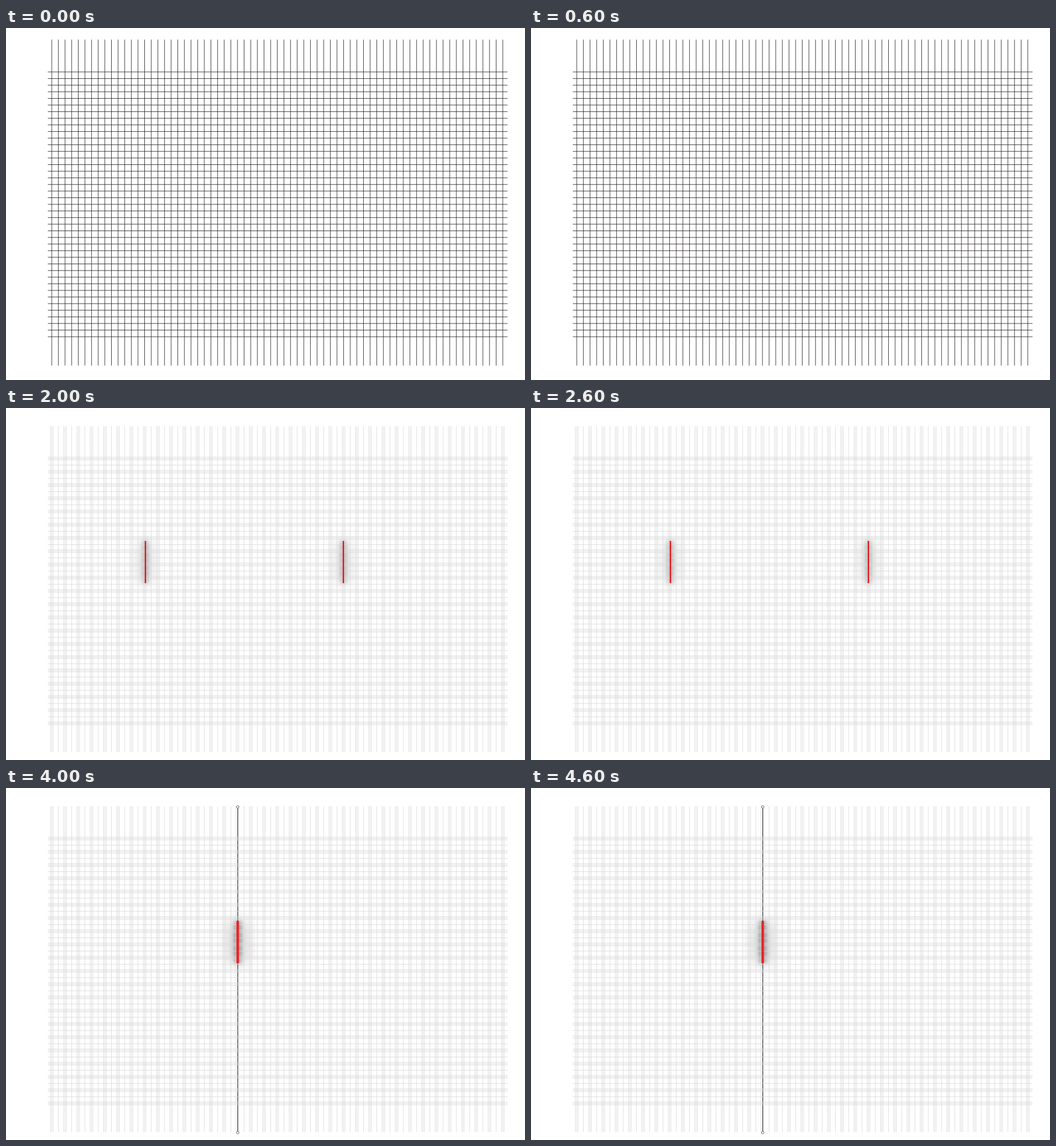
Recreate the animation shown at these times as an HTML page. Size 908 px wide and 617 px high, loop 5000 ms.

```html
<!DOCTYPE html>
<html lang="en">
<head>
<meta charset="utf-8">
<title>Grid</title>
<style>
html, body { margin: 0; width: 100%; height: 100%; overflow: hidden; background: #fff; }
svg { display: block; width: 908px; height: 617px; }
.grid path { fill: none; stroke-width: 0.85; }
</style>
</head>
<body>
<svg id="stage" viewBox="0 0 908 617" xmlns="http://www.w3.org/2000/svg">
  <defs>
    <filter id="near" filterUnits="userSpaceOnUse" x="0" y="0" width="908" height="617"><feGaussianBlur stdDeviation="4"/></filter>
    <filter id="far" filterUnits="userSpaceOnUse" x="0" y="0" width="908" height="617"><feGaussianBlur stdDeviation="14"/></filter>
  </defs>
</svg>
<script>
const stage = document.getElementById('stage');
const STEP = 11.604, LEFT = 80.05, COLS = 69, ROWS = 41, OFFSET = 2.35;
const HIGH = 20.4, LOW = 32;
const BAR_TOP = 233, BAR_HEIGHT = 74;
const INK = '#231f20', RED = '#c1272d', PALE = '#dadada';

function add(parent, name, attrs = {}) {
  const node = document.createElementNS('http://www.w3.org/2000/svg', name);
  for (const key in attrs) node.setAttribute(key, attrs[key]);
  return parent.appendChild(node);
}

// Lines at every step, or a pair flanking every second step.
function positions(start, count, paired) {
  const out = [];
  for (let i = 0; i < count; i++) {
    const p = start + i * STEP;
    if (!paired) out.push(p);
    else if (i % 2 === 0) out.push(p - OFFSET, p + OFFSET);
  }
  return out;
}

function columns(parent, top, paired, stroke) {
  const d = positions(LEFT, COLS, paired).map(x => `M${x} ${top}v571.3`).join('');
  add(parent, 'path', { d, stroke });
}

function rows(parent, top, paired, stroke) {
  const d = positions(top + 56.6, ROWS, paired).map(y => `M73.2 ${y}h804.2`).join('');
  add(parent, 'path', { d, stroke });
}

const group = cls => add(stage, 'g', cls ? { class: cls } : {});

function rect(parent, x, width, attrs) {
  add(parent, 'rect', { x: x - width / 2, y: BAR_TOP, width, height: BAR_HEIGHT, ...attrs });
}

function shadow(parent, x, size) {
  rect(parent, x, 18 * size, { fill: '#000', opacity: 0.2, filter: 'url(#far)' });
  rect(parent, x, 6 * size, { fill: '#000', opacity: 0.38, filter: 'url(#near)' });
}

const plain = group('grid');
columns(plain, HIGH, false, INK);
rows(plain, HIGH, false, INK);

const tartan = group('grid');
columns(tartan, LOW, false, INK);
rows(tartan, LOW, false, INK);
columns(tartan, LOW, true, RED);
rows(tartan, LOW, true, RED);

function paleScene(bars, width, color, spread, axis) {
  const scene = group();
  bars.forEach(x => shadow(scene, x, spread));
  const upright = add(scene, 'g', { class: 'grid' });
  columns(upright, LOW, false, PALE);
  columns(upright, LOW, true, PALE);
  if (axis) add(scene, 'path', { d: `M${axis} 33V604`, stroke: '#1c1c1c', 'stroke-width': 1 });
  const level = add(scene, 'g', { class: 'grid' });
  rows(level, LOW, false, PALE);
  rows(level, LOW, true, PALE);
  bars.forEach(x => rect(scene, x, width, { fill: color }));
  if (axis) {
    for (const cy of [33, 604]) {
      add(scene, 'circle', { cx: axis, cy, r: 2.2, fill: '#fff', stroke: '#444', 'stroke-width': 0.8 });
    }
  }
  return scene;
}

const scenes = [
  plain,
  tartan,
  paleScene([243.9, 590.2], 2.4, '#e3161b', 1),
  paleScene([333.3, 498.3], 2.4, '#e3161b', 1),
  paleScene([405.4], 4.4, '#ed2024', 1.7, 405.5)
];

function draw(time) {
  const current = Math.floor(time / 1000) % scenes.length;
  scenes.forEach((scene, i) => scene.setAttribute('display', i === current ? 'inline' : 'none'));
}

const start = performance.now();
function tick() {
  draw(performance.now() - start);
  requestAnimationFrame(tick);
}
tick();
</script>
</body>
</html>
```
